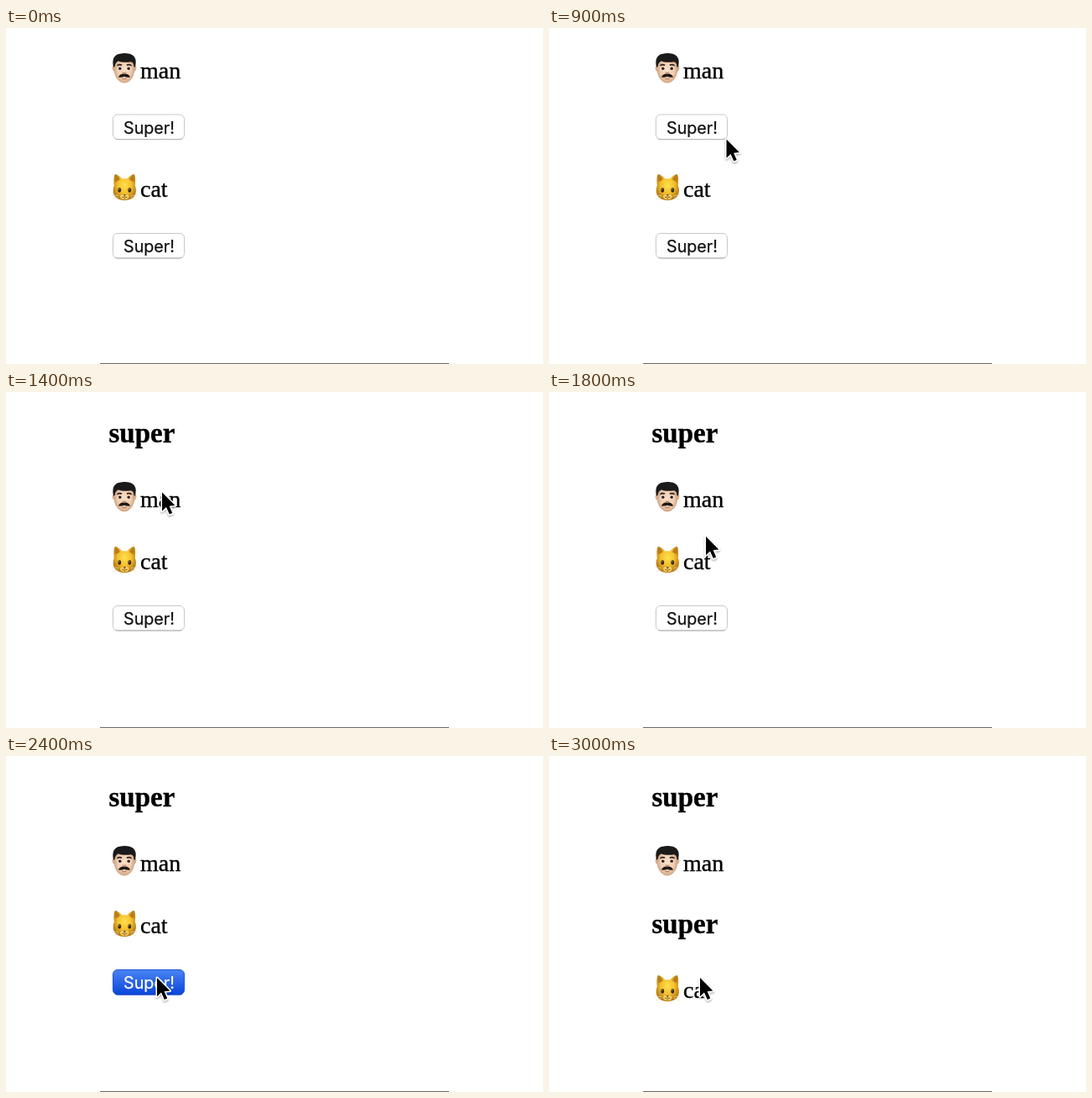
Animation, 640 px wide and 400 px high, one loop 3700 ms. Source, as an HTML page:

```html
<!DOCTYPE html>
<html lang="en">
<head>
<meta charset="utf-8">
<title>Super buttons</title>
<style>
html, body { margin: 0; width: 100%; height: 100%; overflow: hidden; background: #fff; }
svg { display: block; width: 100%; height: 100%; }
.name, .title { stroke: #000; stroke-width: .35; }
.name { font: 28px "Liberation Serif", "Times New Roman", serif; }
.title { font: bold 33px "Liberation Serif", "Times New Roman", serif; }
.label { font: 19.7px Inter, sans-serif; text-anchor: middle; fill: #111; stroke: #111; stroke-width: .25; }
.face { fill: #fff; stroke: #c8c8c8; }
.edge { stroke: #b0b0b0; fill: none; }
.down .face { fill: url(#blue); stroke: #1f56d8; }
.down .edge { stroke: #0d3fc0; }
.down .label { fill: #fff; stroke: #fff; }
</style>
</head>
<body>
<svg viewBox="0 0 640 400">
  <defs>
    <linearGradient id="blue" x2="0" y2="1">
      <stop offset="0" stop-color="#4a84f3"/>
      <stop offset="1" stop-color="#0b45dc"/>
    </linearGradient>
    <radialGradient id="skin" cx=".5" cy=".5" r=".6">
      <stop offset="0" stop-color="#fbe0c8"/>
      <stop offset=".55" stop-color="#f0cdb0"/>
      <stop offset="1" stop-color="#b98862"/>
    </radialGradient>
    <radialGradient id="fur" cx=".5" cy=".42" r=".6">
      <stop offset="0" stop-color="#ffe04e"/>
      <stop offset=".5" stop-color="#f4c02c"/>
      <stop offset="1" stop-color="#ac7010"/>
    </radialGradient>
    <filter id="shade" x="-50%" y="-50%" width="200%" height="200%">
      <feDropShadow dx="0" dy="1.5" stdDeviation="1.3" flood-opacity=".35"/>
    </filter>
  </defs>

  <path d="M112 399.5H528" stroke="#6c6c6c"/>

  <g id="man">
    <g transform="translate(126.5 30)">
      <path d="M2.2 15C0 14 0 21 2.8 21.5M26.8 15C29 14 29 21 26.2 21.5" fill="#dcb292" stroke="#b98a68" stroke-width=".6"/>
      <path d="M2.3 11C2.3 2 26.7 2 26.7 11V20C26.5 29 20 35.6 14.5 35.6S2.5 29 2.3 20Z" fill="url(#skin)"/>
      <path d="M1.7 17C-.6 8 2 1.6 9 .7C14-.6 22-.3 25.5 3.2C29 6.7 28.6 12 27.3 17L25.8 15.5C26 12.5 25 10.8 22.5 10.2C16 11.3 10 10.7 7.5 9.2C5 10.4 3.6 12 3.2 15.5Z" fill="#1a1a1a"/>
      <path d="M6 14.8Q8.6 12.8 11.6 14.2M17.4 14.2Q20.4 12.8 23 14.8" fill="none" stroke="#2c211c" stroke-width="1.5"/>
      <g fill="#fff"><ellipse cx="9.2" cy="18.2" rx="2.4" ry="1.7"/><ellipse cx="19.8" cy="18.2" rx="2.4" ry="1.7"/></g>
      <g fill="#30201a"><circle cx="9.3" cy="18.2" r="1.8"/><circle cx="19.7" cy="18.2" r="1.8"/></g>
      <path d="M12.3 22.8Q14.5 24.2 16.7 22.8" fill="none" stroke="#b47d58" stroke-width="1.2"/>
      <path d="M14.5 24.8C16.5 23.7 20 25 21.6 28.2C19 29.3 16.6 28.7 14.5 27.7C12.4 28.7 10 29.3 7.4 28.2C9 25 12.5 23.7 14.5 24.8Z" fill="#1d1916"/>
      <path d="M12 30.1Q14.5 31.4 17 30.1" fill="none" stroke="#bd7763" stroke-width="1.2"/>
    </g>
    <text class="name" x="160" y="60">man</text>
  </g>

  <g id="cat">
    <g transform="translate(126 173)">
      <path d="M2.9 14.5C2.2 8.5 2.4 3.5 4 .9C7.5 1.7 10.5 4 12.3 6.6Q15.3 5.8 18.3 6.6C20.2 4 23.2 1.7 26.7 .9C28.3 3.5 28.5 8.5 27.8 14.5C29.6 19 29.3 24 26.7 27.6C24 31 20 32.2 15.3 32.2S6.7 31 4 27.6C1.4 24 1.1 19 2.9 14.5Z" fill="url(#fur)"/>
      <path d="M4.4 10.5C4 7 4.1 4.6 5 2.8C7.4 4 8.8 5.5 9.6 7.4ZM26.3 10.5C26.7 7 26.6 4.6 25.7 2.8C23.3 4 21.9 5.5 21.1 7.4Z" fill="#b87b1c"/>
      <ellipse cx="15.3" cy="27.8" rx="5.2" ry="3.4" fill="#f6d463"/>
      <g fill="#352411"><ellipse cx="9.3" cy="20" rx="1.9" ry="2.8"/><ellipse cx="21.3" cy="20" rx="1.9" ry="2.8"/></g>
      <g fill="#fff"><circle cx="8.9" cy="19" r=".6"/><circle cx="20.9" cy="19" r=".6"/></g>
      <path d="M13.3 24.9H17.3L15.3 27Z" fill="#7c4526"/>
      <path d="M12 28Q13.8 29.6 15.3 27.4Q16.8 29.6 18.6 28" fill="none" stroke="#7a4b18" stroke-width=".9"/>
      <path d="M14 29.2H16.6L15.3 31Z" fill="#a8533a"/>
      <path d="M8 26.6L.5 26M8 28.4L1.5 31M22.6 26.6L30.2 26M22.6 28.4L29.2 31" stroke="#e9dcae" stroke-width=".7"/>
    </g>
    <text class="name" x="160" y="201">cat</text>
  </g>

  <g id="titles">
    <text class="title" x="122.5" y="59.5">super</text>
    <text class="title" x="122.5" y="210.5">super</text>
  </g>
  <g id="buttons"></g>

  <g id="cursor">
    <path d="M0 0V22.2L5 17.4L8.8 26L12.2 24.6L8.6 16.2L15.4 15.6Z" stroke="#fff" stroke-width="3" paint-order="stroke" stroke-linejoin="round" filter="url(#shade)"/>
  </g>
</svg>
<script>
const LOOP = 3700, STEP = 100;
const SHOW = 500, PRESS = [1100, 2400], RELEASE = [1200, 2500];
// time, x, y of the pointer tip
const PATH = [
  [500, 458, 203.5], [600, 424, 194], [700, 352, 173], [800, 268, 149], [900, 211.5, 132.5], [1000, 186, 119.5],
  [1600, 186, 119.5], [1700, 186, 130], [1800, 187, 172], [1900, 187, 217], [2000, 186, 244.5], [2200, 180, 264]
];

const $ = id => document.getElementById(id);
const shift = (el, x, y) => el.setAttribute("transform", `translate(${x} ${y})`);
const show = (el, on) => el.setAttribute("visibility", on ? "visible" : "hidden");

$("buttons").innerHTML = `<g>
  <rect class="face" x="127.5" y=".5" width="85" height="29.5" rx="5.5"/>
  <path class="edge" d="M130 29.2Q131 30 133 30H207Q209 30 210 29.2"/>
  <text class="label" x="170.5" y="23">Super!</text>
</g>`.repeat(2);
const buttons = [...$("buttons").children];
const titles = [...$("titles").children];

function pointer(t) {
  const i = PATH.findIndex(p => p[0] > t);
  if (i < 0) return PATH[PATH.length - 1].slice(1);
  if (i === 0) return PATH[0].slice(1);
  const [a, b] = [PATH[i - 1], PATH[i]];
  const k = (t - a[0]) / (b[0] - a[0]);
  return [a[1] + (b[1] - a[1]) * k, a[2] + (b[2] - a[2]) * k];
}

function draw(time) {
  const t = Math.floor(time % LOOP / STEP) * STEP;
  const done = RELEASE.map(r => t >= r);

  shift($("man"), 0, done[0] ? 77 : 0);
  shift($("cat"), 0, done[1] ? 87 : done[0] ? 10 : 0);
  shift(buttons[0], 0, 102.5);
  shift(buttons[1], 0, done[0] ? 254 : 244);
  buttons.forEach((b, i) => {
    show(b, !done[i]);
    show(titles[i], done[i]);
    b.classList.toggle("down", t >= PRESS[i] && !done[i]);
  });

  show($("cursor"), t >= SHOW);
  shift($("cursor"), ...pointer(t));
}

const start = performance.now();
function tick() {
  draw(performance.now() - start);
  requestAnimationFrame(tick);
}
tick();
</script>
</body>
</html>
```
